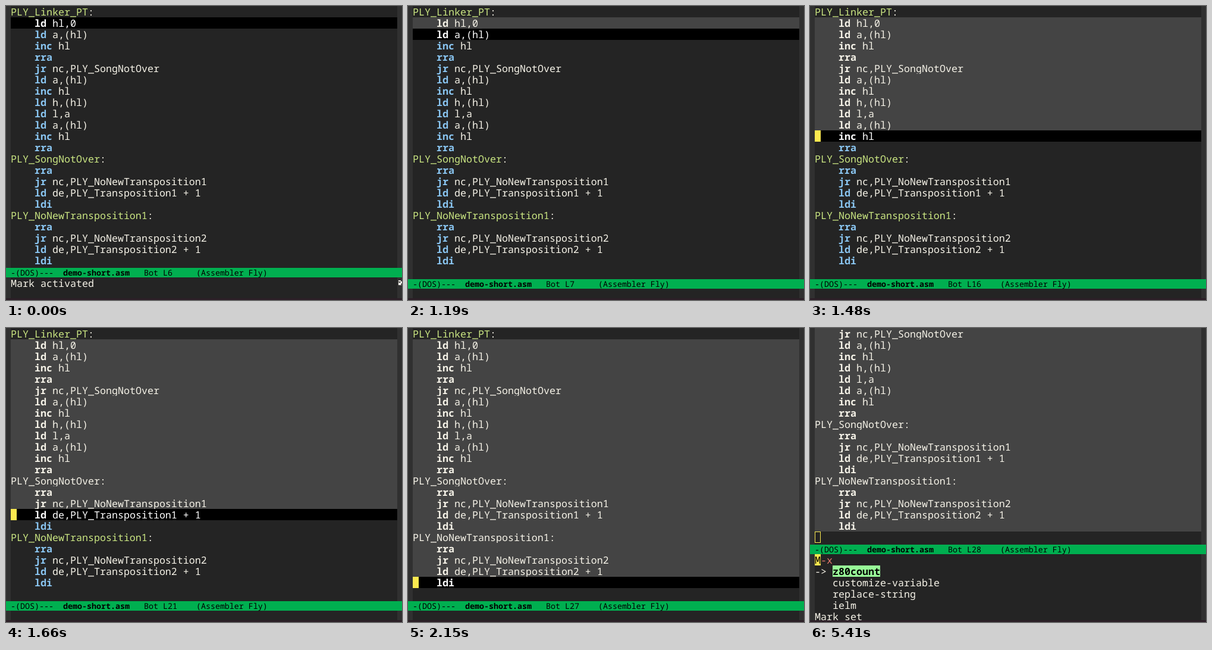
An HTML page for the animation above (8 s loop, 666 by 494 pixels).

```html
<!DOCTYPE html>
<html lang="en">
<head>
<meta charset="utf-8">
<title>Assembler editor</title>
<style>
html, body { margin: 0; width: 100%; height: 100%; overflow: hidden; background: #242424; }
svg { display: block; width: 666px; height: 494px; }
text { font: 16.667px "Noto Sans Mono", "DejaVu Sans Mono", monospace; fill: #f6f3e8; white-space: pre; text-rendering: geometricPrecision; }
.op { fill: #8ac6f2; font-weight: bold; }
.label { fill: #cae682; }
.marked .op, .marked .label { fill: #f6f3e8; }
.current, .current .op, .current .label { fill: #fff; }
.bold { font-weight: bold; }
.bar { font-size: 13.333px; fill: #000; }
.prompt { fill: #e5786d; }
.dark { fill: #000; }
</style>
</head>
<body>
<svg id="stage" viewBox="0 0 666 494"></svg>
<script>
const LOOP = 8000, ROW = 19, LEFT = 8, WIDTH = 650, FIRST_LINE = 5;
const CURSOR = '#fce94f';
const CURLY_ARROW = 'M2 0h4v1h1v1h1v3h-1v1h-1v1h1v1h-5v-5h1v1h2v-1h1v-1h-4z';
const code = `PLY_Linker_PT:
ld hl,0
ld a,(hl)
inc hl
rra
jr nc,PLY_SongNotOver
ld a,(hl)
inc hl
ld h,(hl)
ld l,a
ld a,(hl)
inc hl
rra
PLY_SongNotOver:
rra
jr nc,PLY_NoNewTransposition1
ld de,PLY_Transposition1 + 1
ldi
PLY_NoNewTransposition1:
rra
jr nc,PLY_NoNewTransposition2
ld de,PLY_Transposition2 + 1
ldi`.split('\n');

// Key repeat: [time, line] anchors with even steps in between.
const keyRepeat = [[1190, 7], [1230, 8], [1480, 16], [1660, 21], [1830, 26]];

const stage = document.getElementById('stage');
const rect = (x, y, w, h, fill) => `<rect x="${x}" y="${y}" width="${w}" height="${h}" fill="${fill}"/>`;
const text = (x, y, content, cls = '') => `<text x="${x}" y="${y}" class="${cls}">${content}</text>`;
const span = (cls, content) => `<tspan class="${cls}">${content}</tspan>`;
const rowText = (x, top, content, cls) => text(x, top + 16, content, cls);

function lineAt(t) {
  if (t < 1190) return 6;
  if (t >= 4320) return 28;
  if (t >= 2150) return 27;
  if (t >= 1830) return 26;
  const next = keyRepeat.findIndex(([time]) => time > t);
  const [t0, l0] = keyRepeat[next - 1], [t1, l1] = keyRepeat[next];
  return l0 + Math.floor((t - t0) / (t1 - t0) * (l1 - l0) + 1e-6);
}

function codeLine(source, top, cls) {
  if (source.endsWith(':')) return rowText(LEFT, top, span('label', source.slice(0, -1)) + ':', cls);
  const [op, ...args] = source.split(' ');
  return rowText(LEFT + 40, top, span('op', op) + (args.length ? ' ' + args.join(' ') : ''), cls);
}

function modeLine(top, line) {
  return rect(0, top, 666, 16, '#00af50') + text(LEFT, top + 13,
    '-(DOS)---  ' + span('bold', 'demo-short.asm') + '   ' +
    `Bot L${line}`.padEnd(11) + '(Assembler Fly)', 'bar');
}

function buffer(line, scroll, cursor) {
  const current = line - FIRST_LINE;
  let out = '';
  for (let i = scroll; i < code.length; i++) {
    const top = (i - scroll) * ROW;
    const marked = i >= 1 && i < current;
    if (marked) out += rect(LEFT, top, WIDTH, ROW, '#444444');
    if (i === current) out += rect(LEFT, top, WIDTH, ROW, '#000');
    out += codeLine(code[i], top, i === current ? 'current' : marked ? 'marked' : '');
  }
  const top = (current - scroll) * ROW;
  if (cursor === 'solid') out += rect(LEFT, top, 10, ROW, CURSOR);
  if (cursor === 'hollow') {
    out += `<rect x="8.5" y="${top + 0.5}" width="9" height="18" fill="none" stroke="${CURSOR}"/>`;
  }
  return out;
}

function commandPrompt() {
  return rect(LEFT, 380, 10, ROW, CURSOR) +
    rowText(LEFT, 380, span('dark', 'M') + '-x', 'prompt') +
    rowText(LEFT, 399, '-&gt;') +
    rect(38, 399, 80, ROW, '#98fb98') + rowText(38, 399, 'z80count', 'bold dark') +
    ['customize-variable', 'replace-string', 'ielm']
      .map((name, i) => rowText(38, 418 + i * ROW, name)).join('') +
    rowText(LEFT, 475, 'Mark set');
}

function echoMessage() {
  return rowText(LEFT, 456, 'Mark activated') +
    `<path d="${CURLY_ARROW}" transform="translate(658 461)" fill="#f6f3e8"/>`;
}

let shown = '';
function render(t) {
  const line = lineAt(t);
  const prompting = t >= 5410, message = t < 530;
  const cursor = prompting ? 'hollow' : t >= 1230 ? 'solid' : 'none';
  const state = [line, prompting, message, cursor].join();
  if (state === shown) return;
  shown = state;
  stage.innerHTML = rect(0, 0, 666, 494, '#242424') +
    rect(0, 0, LEFT, 494, '#303030') + rect(658, 0, 8, 494, '#303030') +
    buffer(line, prompting ? 5 : 0, cursor) +
    modeLine(prompting ? 364 : message ? 440 : 459, line) +
    (prompting ? commandPrompt() : message ? echoMessage() : '') +
    rect(0, 491, 666, 3, '#2c1f27');
}

const start = performance.now();
function tick() {
  render((performance.now() - start) % LOOP);
  requestAnimationFrame(tick);
}
tick();
</script>
</body>
</html>
```
